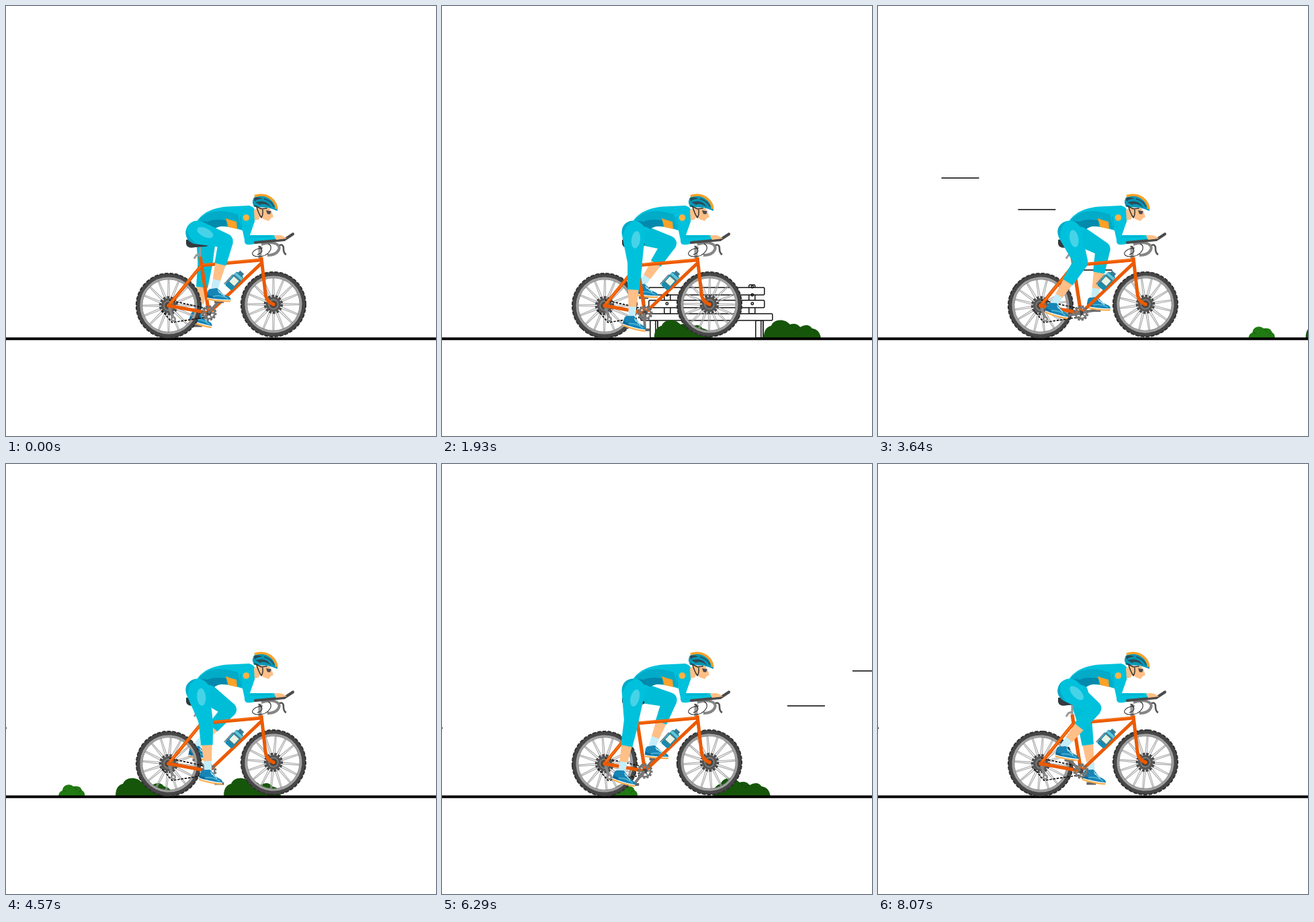
These frames come from a looping animation (640 by 640 pixels, 8140 ms). An HTML page with a canvas:

```html
<!DOCTYPE html>
<html lang="en">
<head>
<meta charset="utf-8">
<title>Cyclist</title>
<style>
html, body { margin: 0; width: 100%; height: 100%; overflow: hidden; background: #fff; }
canvas { display: block; }
</style>
</head>
<body>
<canvas id="stage" width="640" height="640"></canvas>
<script>
const g = document.getElementById('stage').getContext('2d');
const LOOP = 8140, STEPS = 114, TURN = 1400, TAU = Math.PI * 2, DEG = TAU / 360;
const ORANGE = '#eb5a00', TEAL = '#00c1dc', DEEP = '#0389ac', MID = '#02abc8',
  SKIN = '#ffbf87', GOLD = '#ffa126', DARK = '#474747', GREY = '#858585';

function fill(d, color) {
  g.fillStyle = color;
  g.fill(new Path2D(d));
}
function line(d, color, width, dash = []) {
  g.strokeStyle = color;
  g.lineWidth = width;
  g.setLineDash(dash);
  g.stroke(new Path2D(d));
  g.setLineDash([]);
}
function disc(x, y, r, color) {
  g.fillStyle = color;
  g.beginPath();
  g.arc(x, y, r, 0, TAU);
  g.fill();
}
function ring(r, width, color, dash = []) {
  g.strokeStyle = color;
  g.lineWidth = width;
  g.setLineDash(dash);
  g.beginPath();
  g.arc(0, 0, r, 0, TAU);
  g.stroke();
  g.setLineDash([]);
}
function at(x, y, angle, draw) {
  g.save();
  g.translate(x, y);
  g.rotate(angle);
  draw();
  g.restore();
}

// Scenery: kind, x at a given time, speed in px/ms
const scenery = [
  ['bush', -18, 1070, .66],
  ['bench', 0, 2710, .51],
  ['bush', -83, 2710, .51],
  ['bush', 80, 2710, .51],
  ['shrub', 78, 4570, .51],
  ['bush', 163, 4570, .51],
  ['bush', 324, 4570, .51],
  ['shrub', 580, 5640, .51],
  ['bush', 74, 6930, .51]
];
const draw = {
  bush() {
    fill('M0 494C0 481 6 477 11 476C14 466 31 464 39 474Q49 471 54 478Q66 471 72 480Q83 481 85 494Z', '#16560a');
    line('M39 474q4 2 5 6M54 478q-6 1-7 5M72 480q4 2 4 6', '#0d4305', 1);
  },
  shrub() {
    fill('M0 495Q0 488 6 486C6 477 18 475 22 480Q33 478 35 486Q40 488 39 495Z', '#217a13');
    line('M6 486q4-1 6 3M22 480q5 2 5 6M35 486q-5 0-6 4', '#145c0b', 1);
  },
  bench() {
    g.fillStyle = '#fff';
    g.strokeStyle = '#111';
    g.lineWidth = 1.5;
    const box = (x, y, w, h) => {
      g.beginPath();
      g.roundRect(x, y, w, h, 1.5);
      g.fill();
      g.stroke();
    };
    for (const x of [-68, 58]) box(x, 415, 9, 43);
    for (const y of [419, 438]) box(-91, y, 172, 11);
    for (const x of [-64, 63]) for (const y of [418, 430, 443]) {
      g.beginPath();
      g.arc(x, y, 1.7, 0, TAU);
      g.stroke();
    }
    for (const x of [-89, 68]) { box(x, 468, 11, 26); box(x + 8, 468, 3, 26); }
    box(-103, 458, 196, 10);
  }
};

// Wind streaks: x at 6930 ms and y
const streaks = [[-11, 360], [86, 308], [237, 256], [351, 303], [435, 393]];

function background(t) {
  for (const [x, y] of streaks) for (const start of [3466, 6930]) {
    const left = Math.max(-55 - (y !== 393) * 3, x - .812 * (t - start));
    if (left < 640) line(`M${left} ${y}h56`, '#000', 1.6);
  }
  for (const [kind, x, time, speed] of scenery) {
    const left = x - speed * (t - time);
    if (left < 750 && left > -120) at(left, 0, 0, draw[kind]);
  }
  g.fillStyle = '#000';
  g.fillRect(0, 493.3, 640, 4);
}

function wheel(x, y, angle) {
  at(x, y, angle, () => {
    for (let i = 0; i < 16; i++) {
      g.save();
      g.rotate(i * TAU / 16);
      line('M9-1.4L40-.8M9 1.4L40 .8', '#a4a4a4', 1.1);
      g.restore();
    }
    ring(45, 6.5, DARK);
    ring(48.1, 2, '#303030', [5.2, 2.4]);
    ring(41, 3.2, '#a0a0a0');
    ring(39.2, .8, '#777');
    disc(0, 0, 11, '#555');
    ring(12.5, 3.4, DARK, [3.6, 2]);
    ring(7, 1.3, '#858585');
    disc(0, 0, 4, '#333');
  });
}

function crank(angle) {
  at(301, 457, angle, () => {
    line('M0 0H24', '#777', 4);
    at(24, 0, -angle, () => line('M-7 1H7', '#666', 4));
  });
}

function chainring(angle) {
  at(302, 457, angle, () => {
    ring(8.5, 2.6, '#777');
    ring(10.5, 2, '#666', [3.2, 2.3]);
    line('M-8 0H8M-4-7L4 7M-4 7L4-7', '#777', 2);
    disc(0, 0, 3.5, DARK);
  });
}

function bikeFrame() {
  line('M243 438L302 451M232 453L247 471L300 463', '#111', 1.7, [3.5, 1.8]);
  line('M243 448L249 466', GREY, 4);
  disc(249, 466, 4, '#8c8c8c');
  disc(249, 466, 1.6, '#eee');
  line('M289 358V374M283 371L289 369M284 370L280 376', '#999', 3);
  line('M378 357V378', '#999', 5);
  line('M242 446L291 386M242 446L302 457L381 382', ORANGE, 5);
  line('M289 373L302 457M291 386L380 378', ORANGE, 5.2);
  line('M292 384.5L378 377M244 443L290 387', '#ff7a1a', 1.2);
  line('M380 374L386 427Q387 440 398 444', ORANGE, 5);
  disc(242, 446, 3, ORANGE);
  disc(398, 444, 3, ORANGE);
  at(340, 409, 42 * DEG, () => {
    g.fillStyle = '#168caf';
    g.beginPath();
    g.roundRect(-7, -13, 14, 27, 3);
    g.fill();
    g.fillStyle = '#e9f4e4';
    g.fillRect(-5, -5, 10, 11);
    g.fillStyle = '#63c5d7';
    g.fillRect(-7, -11, 14, 4);
    g.fillStyle = '#397b91';
    g.fillRect(-4, -17, 8, 5);
    line('M-8-5H8M-8 7H8M-8-5V14', '#567884', 1.4);
  });
  fill('M268 348Q274 346 282 350L301 353Q303 357 298 358L282 359Q270 362 268 354Z', '#333a40');
}

function handlebar() {
  line('M380 355C396 349 410 354 406 363Q402 371 389 371', GREY, 4);
  line('M407 356Q413 354 413 361Q413 368 417 370', '#555', 2.6);
  line('M382 360C365 362 362 372 374 373C392 374 400 357 390 354M376 357Q387 366 374 370', '#222', 1.1);
}

function aerobar() {
  g.lineCap = 'round';
  line('M371 352L398 349.5L414 348L427 339.5', '#4a4a4a', 4.2);
  g.lineCap = 'butt';
}

function taper(x1, y1, r1, x2, y2, r2, color) {
  const a = Math.atan2(y2 - y1, x2 - x1);
  const k = Math.acos((r1 - r2) / Math.hypot(x2 - x1, y2 - y1));
  g.fillStyle = color;
  g.beginPath();
  g.arc(x1, y1, r1, a + k, a - k + TAU);
  g.arc(x2, y2, r2, a - k, a + k);
  g.fill();
}

function shoe() {
  fill('M-18-8Q-19-17-13-17L-5-19Q0-16 5-11L14-8Q18-6 17-2L-18-2Z', '#1685b6');
  fill('M-18-9Q-13-5-8-8L-9-2H-18Z', '#086a9a');
  line('M-3-16L0-12M0-14L4-10M4-11L8-8', '#bce9f1', 1.3);
  line('M-10-6Q2-10 13-5', '#54bad7', 1.5);
  line('M-18-3Q-4-1 17-3', '#fff', 1.5);
  line('M-18-1.5Q0 1 17-1.5', '#ffae4c', 2.3);
}

function leg(hipX, hipY, phase, slip, near) {
  const angle = phase - 48 * DEG, thigh = 42, shin = 72;
  const tilt = (11 - 6 * Math.cos(phase)) * DEG;
  const footX = 301 + 24 * Math.cos(angle) + slip, footY = 457 + 24 * Math.sin(angle);
  const c = Math.cos(tilt), s = Math.sin(tilt);
  const ankleX = footX - 8 * c + 19 * s, ankleY = footY - 8 * s - 19 * c;
  const dx = ankleX - hipX, dy = ankleY - hipY;
  const d = Math.min(Math.hypot(dx, dy), thigh + shin - .1);
  const bend = Math.acos((thigh ** 2 + d ** 2 - shin ** 2) / (2 * thigh * d));
  const up = Math.atan2(dy, dx) - bend;
  const kneeX = hipX + thigh * Math.cos(up), kneeY = hipY + thigh * Math.sin(up);
  const suit = near ? TEAL : '#00bdd7';

  crank(angle);
  at(kneeX, kneeY, Math.atan2(ankleY - kneeY, ankleX - kneeX), () => {
    const len = Math.hypot(ankleX - kneeX, ankleY - kneeY);
    const part = (u, v, r, q, color) => fill(`M${u * len} ${-r}L${v * len} ${-q}V${q}L${u * len} ${r}Z`, color);
    part(.45, .85, 8.2, 5.8, SKIN);
    part(.83, 1.04, 5.8, 5.3, '#c4edfa');
    part(0, .5, 11, 8.7, suit);
  });
  at(footX, footY, tilt, shoe);
  if (!near) {
    taper(hipX, hipY, 15, kneeX, kneeY, 11, suit);
    return;
  }
  const seatX = hipX - 1, seatY = hipY - 5;
  taper(seatX, seatY, 17.5, kneeX, kneeY, 10.5, suit);
  at(seatX, seatY, Math.atan2(kneeY - seatY, kneeX - seatX), () => {
    fill('M-17-2Q-13 11 4 16Q-13 20-17 4Z', MID);
    g.fillStyle = '#46d3e8';
    g.beginPath();
    g.ellipse(11, -3, 13, 6.5, .18, 0, TAU);
    g.fill();
  });
}

function torso() {
  fill('M282 325C289 309 307 298 342 298L362 297Q373 300 371 312L370 321L363 341L397 341Q405 341 407 347L399 349L365 355Q354 357 355 348L352 334Q331 327 317 328L300 337Z', TEAL);
  fill('M283 326Q288 313 304 307Q317 304 329 306L345 310L351 333Q331 325 317 328L298 330Z', MID);
  fill('M277 327Q286 318 300 321Q310 316 328 319L329 328Q316 327 310 332Q300 325 286 326Z', DEEP);
  fill('M327 316Q335 319 343 321L344 332L331 329Z', GOLD);
  line('M351 330L349 313M362 344L395 343', '#00a9c5', 1.2);
  disc(357.5, 315, 4.8, '#ffb343');
  aerobar();
  fill('M399 342Q409 339 415 344L418 346L402 348Z', SKIN);
}

function head() {
  fill('M369 304L376 300L392 301L396 308L398 314L394 316L391 320L385 318L378 314L376 318L370 319Z', SKIN);
  fill('M387 304L395 305.5L393 310L389 309.5Z', '#4d4c52');
  fill('M367 293C367 277 386 278 396 286Q405 292 404 305Q394 301 389 300L369 299Z', '#0898b6');
  line('M370 283Q384 278 395 287Q402 293 403 302', GOLD, 3.6);
  fill('M369 286Q375 283 382 287Q374 287 370 291ZM371 292Q383 288 390 294L395 300Q384 292 378 296Z', '#294d5a');
  line('M384 287Q395 290 399 299', '#24596b', 2);
  line('M370 297L380 302L389 301M373 299Q376 309 380 315Q383 311 382 303', '#333', 1.5);
}

function paint(t) {
  const phase = t / TURN * TAU;
  g.fillStyle = '#fff';
  g.fillRect(0, 0, 640, 640);
  g.lineCap = 'butt';
  g.lineJoin = 'round';
  background(t);
  leg(298, 341, phase + Math.PI, 4, false);
  wheel(242, 446, phase);
  wheel(398, 444, phase);
  bikeFrame();
  chainring(phase);
  handlebar();
  torso();
  leg(286, 342, phase, -8 + 8 * Math.cos(phase) - 4 * Math.sin(phase), true);
  head();
}

const began = performance.now();
function tick() {
  const t = (performance.now() - began) % LOOP;
  // Steps begin on whole hundredths of a second, up to 5 ms early
  const step = Math.floor((t + 5) * STEPS / LOOP) % STEPS;
  paint(step * LOOP / STEPS);
  requestAnimationFrame(tick);
}
tick();
</script>
</body>
</html>
```
